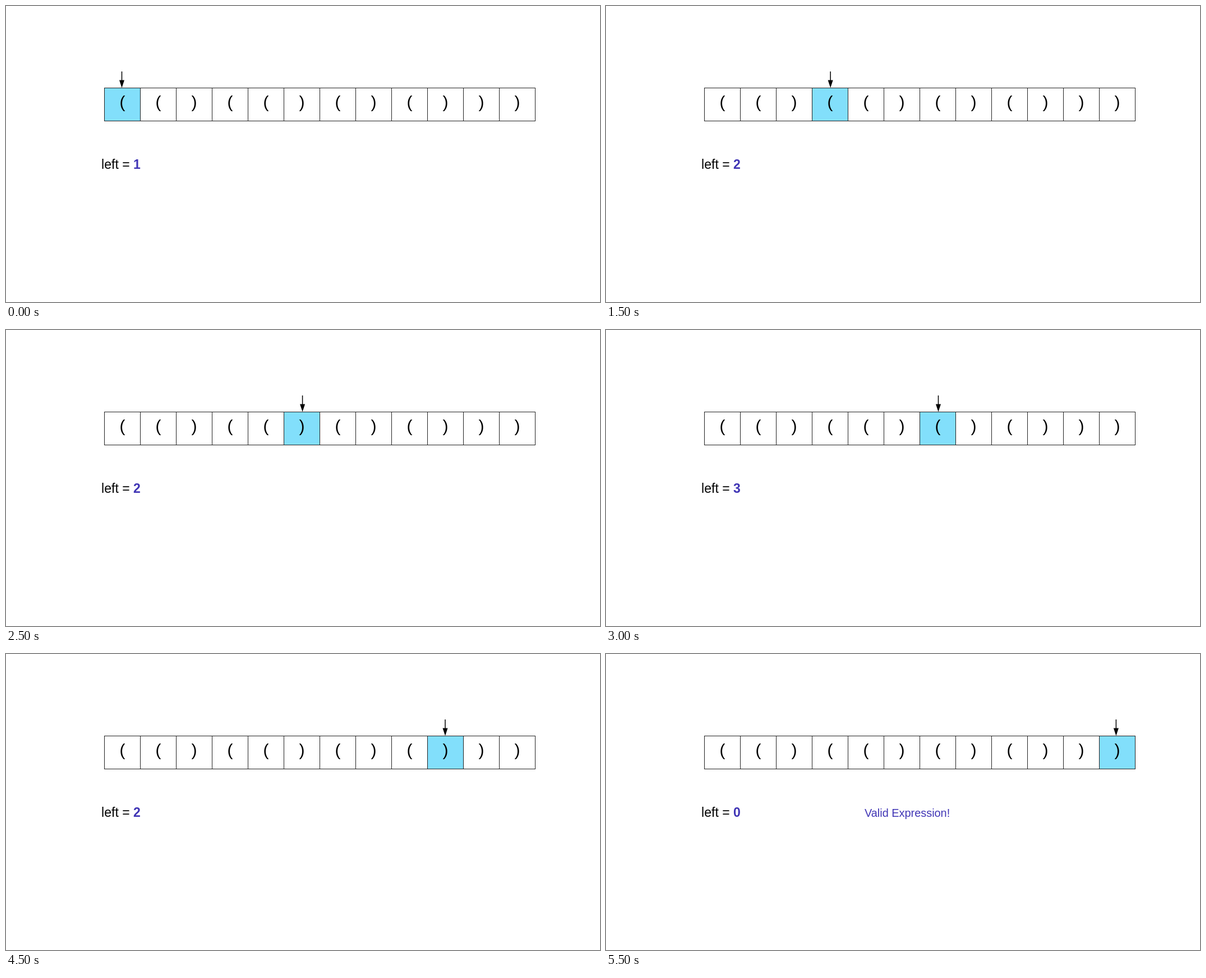
An HTML page with a canvas for the animation above (6 s loop, 1059 by 529 pixels).

```html
<!DOCTYPE html>
<html lang="en">
<head>
<meta charset="utf-8">
<title>Bracket matching</title>
<style>
  html, body { margin: 0; width: 100%; height: 100%; overflow: hidden; background: #fff; }
  canvas { display: block; }
</style>
</head>
<body>
<canvas id="stage" width="1059" height="529"></canvas>
<script>
const ctx = document.getElementById("stage").getContext("2d");
const STEP = 500;
const BRACKETS = [..."(()(()()()))"];
const LAST = BRACKETS.length - 1;
const LEFT = 175.5, TOP = 146.5, CELL = 64, HEIGHT = 59;
const BLUE = "#82dffb";
const INDIGO = "#4035b5";

function text(str, x, y, size, color = "#000", weight = "normal") {
  ctx.font = `${weight} ${size}px "Liberation Sans", Arial, sans-serif`;
  ctx.fillStyle = color;
  ctx.fillText(str, x, y);
  return ctx.measureText(str).width;
}

function drawArrow(step) {
  // The pointer drifts a little to the right of its cell midway
  const x = LEFT + 31 + step * (CELL - 0.1) + 2.6 * Math.sin(Math.PI * step / LAST);
  const tip = TOP - 0.3;
  ctx.fillStyle = "#000";
  ctx.fillRect(x - 0.75, tip - 29.2, 1.5, 17);
  ctx.beginPath();
  ctx.moveTo(x - 4.5, tip - 13.6);
  ctx.lineTo(x + 4.5, tip - 13.6);
  ctx.lineTo(x, tip);
  ctx.fill();
}

function drawRow(active) {
  ctx.strokeStyle = "#222";
  ctx.lineWidth = 1;
  BRACKETS.forEach((bracket, i) => {
    const x = LEFT + i * CELL;
    ctx.fillStyle = i === active ? BLUE : "#fff";
    ctx.fillRect(x, TOP, CELL, HEIGHT);
    ctx.strokeRect(x, TOP, CELL, HEIGHT);
    text(bracket, x + 27, TOP + 35.5, 30);
  });
}

function countOpen(step) {
  return BRACKETS.slice(0, step + 1).reduce((n, b) => n + (b === "(" ? 1 : -1), 0);
}

function draw(step) {
  ctx.fillStyle = "#fff";
  ctx.fillRect(0, 0, 1059, 529);
  drawRow(step);
  drawArrow(step);
  const x = 170.1, y = 291.4;
  const labelWidth = text("left = ", x, y, 23);
  text(countOpen(step), x + labelWidth, y, 23, INDIGO, "bold");
  if (step === LAST) text("Valid Expression!", 461, y, 19.9, INDIGO);
}

function tick() {
  draw(Math.floor(performance.now() / STEP) % BRACKETS.length);
  requestAnimationFrame(tick);
}
tick();
</script>
</body>
</html>
```
